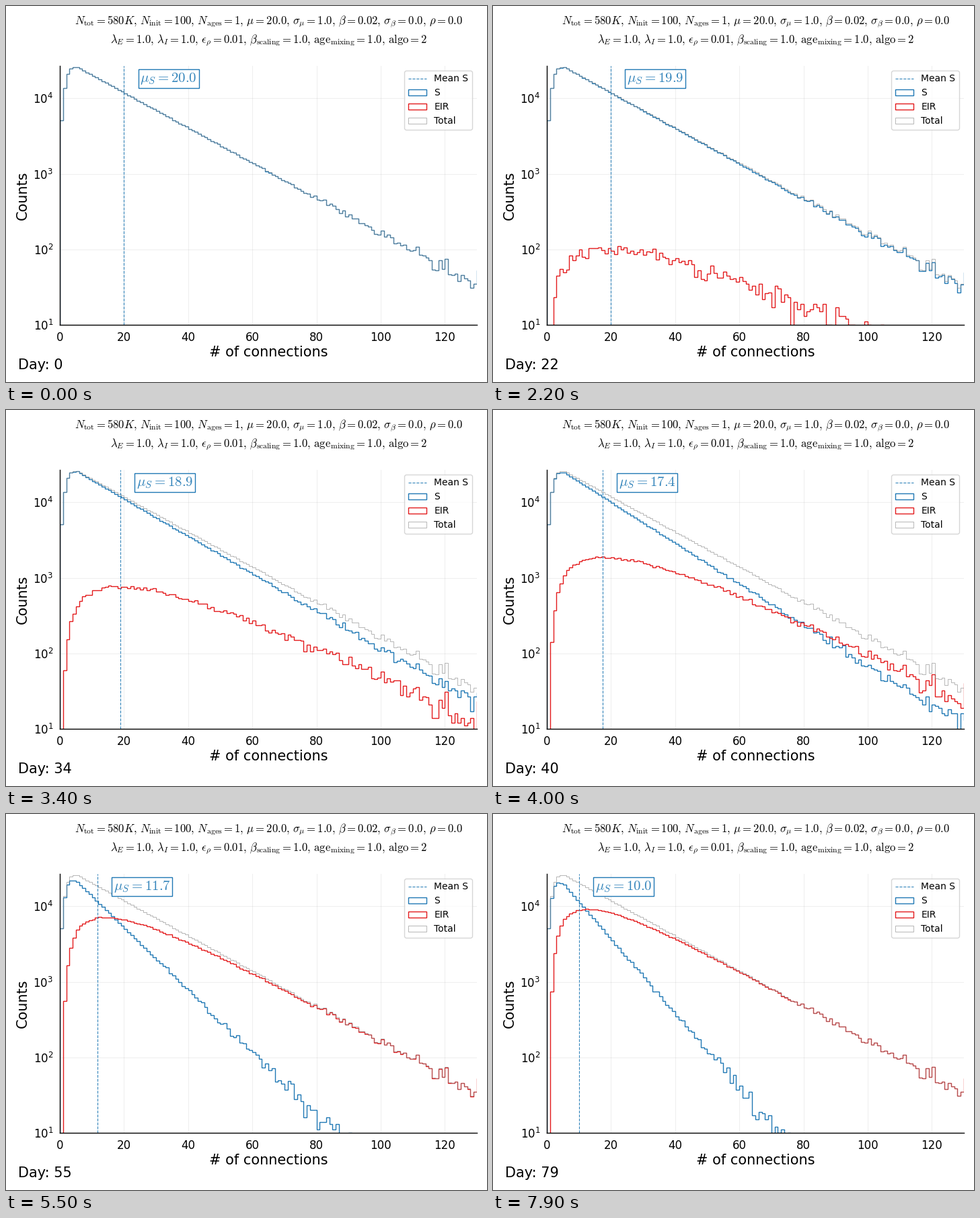
Recreate the animation shown at these times as a matplotlib script. Size 715 px wide and 559 px high, loop 8000 ms.

```python
import numpy as np
import matplotlib.pyplot as plt
from matplotlib.animation import FuncAnimation
from matplotlib.patches import Patch

W, H, DPI = 715, 559, 100
LEFT, RIGHT, TOP, BOTTOM = 80, 700, 89, 474  # axes box, pixels from top left
DAYS = 80
BLUE, RED = "#1f78b4", "#e31a1c"
DECAY = 0.0537

plt.rcParams["font.family"] = "DejaVu Sans"
plt.rcParams["mathtext.fontset"] = "cm"

# Degree distribution: rounded head, exponential body, sparse tail
rng = np.random.default_rng(7)
HEAD = [5130, 13740, 21140, 24900, 25700]
TAIL = [597, 561, 549, 496, 517, 457, 448, 457, 388, 404, 380, 343, 303, 329,
        274, 291, 258, 257, 223, 222, 210, 201, 182, 161, 157, 178, 148, 157,
        145, 121, 123, 113, 116, 100, 96, 98, 109, 85, 82, 78, 72, 54, 53, 71,
        55, 74, 47, 46, 48, 38, 46, 41, 39, 31, 35, 53]
body = 11670 * np.exp(-DECAY * (np.arange(5, 75) - 20))
body += 0.5 * np.sqrt(body) * rng.standard_normal(body.size)
total = np.concatenate([HEAD, np.round(body), TAIL])
k = np.arange(total.size)
edges = np.arange(total.size + 1)
noise = np.clip(rng.standard_normal((2, k.size)), -2.2, 2.2)


def exposure(day):
    """Cumulative infection pressure per connection."""
    return 0.0605 / (1 + np.exp(-0.172 * (day - 50.4)))


def infected(day):
    p = 1 - np.exp(-exposure(day) * k)
    z = noise[0] * np.cos(0.08 * day) + noise[1] * np.sin(0.08 * day)
    count = total * p + z * np.sqrt(total * p * (1 - p))
    return np.clip(np.round(count), 0, total)


def mean_susceptible(day):
    q = exposure(day)
    return 1 / (DECAY + q) + 1.2 + 0.2 * np.exp(-q / 0.02)


fig = plt.figure(figsize=(W / DPI, H / DPI), dpi=DPI, facecolor="white")
ax = fig.add_axes([LEFT / W, 1 - BOTTOM / H, (RIGHT - LEFT) / W, (BOTTOM - TOP) / H])
ax.set_yscale("log")
ax.set_xlim(0, 130)
ax.set_ylim(10, 27000)
ax.minorticks_off()
ax.tick_params(length=0, pad=7, labelsize=12)
ax.set_axisbelow(True)
ax.grid(color="#b0b0b0", alpha=0.2, lw=0.8)
ax.spines[["top", "right"]].set_visible(False)
ax.spines[["left", "bottom"]].set_linewidth(1)


def label(x, y, s, size=15, ha="center", va="baseline", **kw):
    return fig.text(x / W, 1 - y / H, s, fontsize=size, ha=ha, va=va, **kw)


def formula(*parts):
    return "$" + r", \, ".join(parts) + "$"


label(390.5, 28, formula(
    r"N_\mathrm{tot} = 580K", r"N_\mathrm{init} = 100", r"N_\mathrm{ages} = 1",
    r"\mu = 20.0", r"\sigma_\mu = 1.0", r"\beta = 0.02",
    r"\sigma_\beta = 0.0", r"\rho = 0.0"), 12)
label(390.5, 55.5, formula(
    r"\lambda_E = 1.0", r"\lambda_I = 1.0", r"\epsilon_\rho = 0.01",
    r"\beta_\mathrm{scaling} = 1.0", r"\mathrm{age}_\mathrm{mixing} = 1.0",
    r"\mathrm{algo} = 2"), 12)
label(390, 521, "# of connections")
label(35, 282, "Counts", ha="right", va="center", rotation=90)
day_text = label(18, 540, "Day: 0", ha="left")

mean_line = ax.axvline(20, color=BLUE, ls="--", lw=0.8, alpha=0.9, label="Mean S")
S_STYLE = dict(edgecolor=BLUE, lw=1, label="S")
EIR_STYLE = dict(edgecolor=RED, lw=1, label="EIR")
TOTAL_STYLE = dict(edgecolor="gray", lw=0.5, alpha=0.8, label="Total")
hist_s, hist_eir, _ = [ax.stairs(total, edges, baseline=1, **style)
                       for style in (S_STYLE, EIR_STYLE, TOTAL_STYLE)]
mean_text = ax.text(
    25, (BOTTOM - 113) / (BOTTOM - TOP), "", transform=ax.get_xaxis_transform(),
    fontsize=15, color=BLUE, alpha=0.9, va="baseline",
    bbox=dict(facecolor="white", edgecolor=BLUE, pad=2))
boxes = [Patch(facecolor="none", **style)
         for style in (S_STYLE, EIR_STYLE, TOTAL_STYLE)]
ax.legend(handles=[mean_line, *boxes], loc="upper right", fontsize=10)


def update(day):
    eir = infected(day)
    hist_s.set_data(np.maximum(total - eir, 1))
    hist_eir.set_data(np.maximum(eir, 1))
    m = mean_susceptible(day)
    mean_line.set_xdata([m, m])
    mean_text.set_x(m + 5)
    mean_text.set_text(rf"$\mu_S = {m:.1f}$")
    day_text.set_text(f"Day: {day}")
    return hist_s, hist_eir, mean_line, mean_text, day_text


anim = FuncAnimation(fig, update, frames=DAYS, interval=100, repeat=True,
                     repeat_delay=0, blit=False)
plt.show()
```
